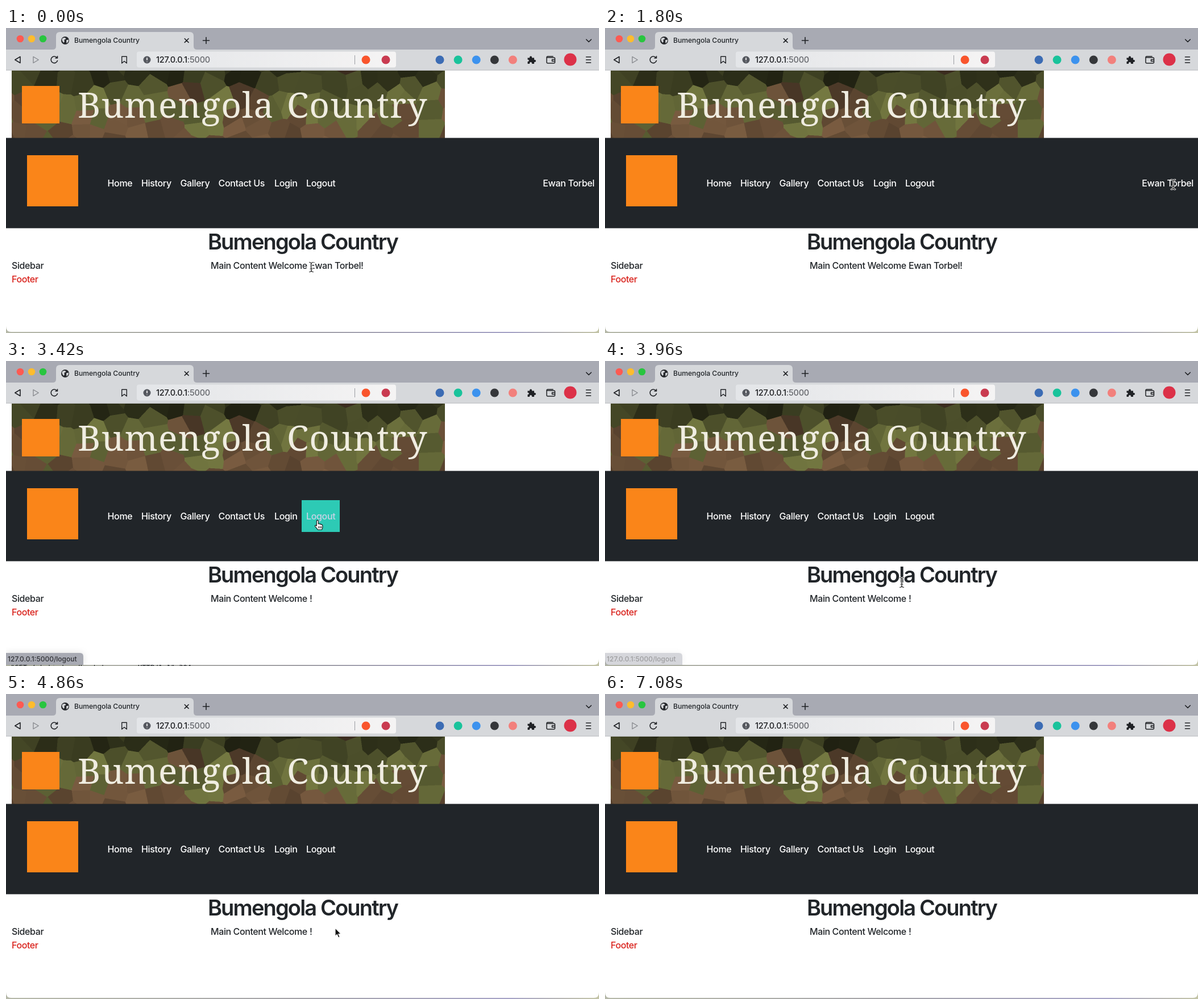
These frames come from a looping animation (1043x537 px, 7140 ms). An HTML page with a canvas:

```html
<!DOCTYPE html>
<html lang="en">
<head>
<meta charset="utf-8">
<title>Bumengola Country</title>
<style>
  html, body { margin: 0; width: 100%; height: 100%; overflow: hidden; background: #fff; }
  canvas { position: absolute; left: 10px; top: 75px; width: 761.5px; height: 119px; }
  svg { position: absolute; left: 0; top: 0; }
  text { font: 450 16px Inter, "Open Sans", sans-serif; font-optical-sizing: none; letter-spacing: -.4px; white-space: pre; fill: #212529; }
  .nav text { fill: #fff; letter-spacing: -.34px; }
  .title { font-size: 38px; font-weight: 560; letter-spacing: -1.85px; }
  .banner { font: 500 62px "Noto Serif", serif; letter-spacing: 1.2px; fill: #f0ede1; }
  .tab { font-size: 12.2px; font-weight: 500; letter-spacing: -.05px; }
  .url { font-size: 14.5px; letter-spacing: -.2px; fill: #1c1d20; }
  .small { font-size: 12px; letter-spacing: 0; fill: #303136; }
  .log { font: 12px "DejaVu Sans Mono", monospace; letter-spacing: 0; }
  .line { fill: none; stroke: #202226; stroke-width: 1.6; stroke-linejoin: round; stroke-linecap: round; }
  #status { filter: drop-shadow(0 0 6px #0002); }
</style>
</head>
<body>
<canvas id="mosaic" width="1524" height="238"></canvas>
<svg width="1043" height="537" viewBox="0 0 1043 537">
  <defs>
    <linearGradient id="field"><stop stop-color="#e3e5e8"/><stop offset="1" stop-color="#f5f4f4"/></linearGradient>
    <linearGradient id="desk"><stop stop-color="#b5b8a8"/><stop offset=".5" stop-color="#a3a2a8"/><stop offset=".85" stop-color="#a5a2c6"/><stop offset="1" stop-color="#c3c4a6"/></linearGradient>
    <clipPath id="edge"><rect y="534" width="1043" height="3"/></clipPath>
    <path id="bar" d="M-3.5 -8.5Q0 -8.5 0 -5.5Q0 -8.5 3.5 -8.5M0 -5.5V5.5M-3.5 8.5Q0 8.5 0 5.5Q0 8.5 3.5 8.5M-2 3H2"/>
  </defs>

  <!-- window bottom -->
  <path d="M0 525Q0 535 9 535H1034Q1043 535 1043 525V537H0Z" fill="url(#desk)"/>
  <g id="log" clip-path="url(#edge)"><text class="log" x="8" y="543.5">"GET /static/css/bootstrap.css HTTP/1.1" 304 -</text></g>

  <!-- tab strip and toolbar -->
  <rect width="1043" height="39" fill="#a8aab3"/>
  <rect y="38" width="1043" height="36" fill="#d6d8db"/>
  <path d="M0 74.2H1043" stroke="#b4b7bb"/>
  <path d="M82 38Q88 38 88 32V14Q88 7 95 7H323Q330 7 330 14V32Q330 38 336 38Z" fill="#d6d8db"/>
  <circle cx="104" cy="22" r="7" fill="#26282c"/>
  <path d="M99 18.5Q102 16 104.5 17.5T102 21Q104 23 101.5 26Q99 23.5 98.5 21ZM106 21.5L110 20.5Q110 25 106.5 27Z" fill="#d6d8db"/>
  <text class="tab" x="120" y="26.3">Bumengola Country</text>
  <g class="line">
    <path d="M314.3 18.7L321 25.4M321 18.7L314.3 25.4M346.5 22H357.5M352 16.5V27.5M1020.7 20.2L1025 24.4L1029.3 20.2"/>
    <path d="M25 50.5V61.5L15.8 56Z"/>
    <path d="M48 50.5V61.5L57.2 56Z" stroke="#85878c" stroke-width="1.3"/>
    <path d="M89.6 52.3A5.8 5.8 0 1 0 90.5 57.5M90.5 49.7V53H87"/>
    <path d="M203.7 50.3H212.3V62L208 58.5L203.7 62Z" stroke-width="1.4"/>
    <path d="M951.5 52H963.5Q965.5 52 965.5 54V60Q965.5 62 963.5 62H953Q951 62 951 60V52Q951 50 953 50H962M965 55.5H960.5V58.5H965" stroke-width="1.5"/>
    <path d="M1020.5 51H1028.5M1020.5 56H1028.5M1020.5 61H1028.5"/>
  </g>
  <rect x="230" y="41.5" width="456" height="28" rx="4" fill="url(#field)"/>
  <circle cx="248" cy="56" r="6.5" fill="#55585f"/>
  <path d="M248 52.3V56.7M248 59V59.8" stroke="#fff" stroke-width="1.6"/>
  <text class="url" x="264" y="61">127.0.0.1<tspan fill="#65676c">:5000</tspan></text>
  <path d="M613.5 48V64" stroke="#9b9da2"/>
  <path d="M917.5 52.5H921V51.5A2 2 0 0 1 925 51.5V52.5H929V56H930A2 2 0 0 1 930 60H929V63H925V62A2 2 0 0 0 921 62V63H917.5V59H918.5A1.7 1.7 0 0 0 918.5 55.7H917.5Z" fill="#202226"/>
  <g id="dots"></g>

  <!-- banner -->
  <rect x="28" y="102" width="66" height="66" fill="#fa8519"/>
  <text class="banner" x="126" y="158">Bumengola</text>
  <text class="banner" x="494" y="158">Country</text>

  <!-- navigation -->
  <rect y="193.5" width="1043" height="159" fill="#212529"/>
  <rect x="37" y="224" width="90" height="90" fill="#fa8519"/>
  <rect id="hover" x="520" y="245" width="67" height="56" fill="#2dcab5"/>
  <g class="nav">
    <text x="178.5" y="279">Home</text>
    <text x="238" y="279">History</text>
    <text x="306.5" y="279">Gallery</text>
    <text x="373.5" y="279">Contact Us</text>
    <text x="472" y="279">Login</text>
    <text id="logout" x="528" y="279">Logout</text>
    <text id="user" x="1035" y="279" text-anchor="end">Ewan Torbel</text>
  </g>

  <!-- page -->
  <text class="title" x="522" y="390" text-anchor="middle">Bumengola Country</text>
  <text x="10" y="424">Sidebar</text>
  <text x="10" y="448" style="fill:#d9211b">Footer</text>
  <rect id="mark" x="534" y="406" height="24" fill="#b3d7fe"/>
  <text x="360" y="424">Main Content Welcome <tspan id="name" x="534">Ewan Torbel!</tspan></text>

  <g id="status">
    <path d="M0 514H130Q136 514 136 520V535H0Z" fill="#a8aab3"/>
    <text class="small" x="3" y="529">127.0.0.1:5000/logout</text>
  </g>

  <!-- pointers, hot spot at 0,0 -->
  <g id="beam" fill="none" stroke-linecap="round">
    <use href="#bar" stroke="#fff" stroke-width="2.8"/>
    <use href="#bar" stroke="#222" stroke-width="1.2"/>
  </g>
  <path id="arrow" d="M0 0V14.5L3.3 11.5L5.6 17L8.1 16L5.8 10.6H10.3Z" fill="#111" stroke="#fff" stroke-width="1.1"/>
  <path id="hand" d="M-1.5 8.5V1Q-1.5 -.6 0 -.6T1.5 1V6Q3.3 4.8 4.4 6.5Q6 5.6 7 7.2Q9 6.8 9 9V12Q9 14 7.7 16H.5Q-1 13.5 -3.8 10.6Q-5 8.8 -3.4 8.3Q-2.4 8.2 -1.5 9.5ZM2 10V13.5M4.5 10V13.5M6.8 10V13.5" fill="#fff" stroke="#111" stroke-width="1.1" stroke-linejoin="round"/>
</svg>
<script>
const LOOP = 7140, STEP = 60;
const $ = id => document.getElementById(id);
const show = (id, on) => $(id).style.display = on ? '' : 'none';
const ramp = (t, a, b) => Math.min(1, Math.max(0, (t - a) / (b - a)));
const between = (v, a, b) => v >= a && v < b;

// pointer stops: time, x, y, sideways sway until the next stop
const stops = [
  [0, 537, 421], [360, 608, 421], [1020, 968, 271, 25], [2160, 985, 277],
  [2400, 546, 281], [3660, 548, 281], [3960, 522, 390], [4200, 525, 420, 20],
  [4860, 579, 412], [5040, 985, 276, 25], [5820, 1005, 275], [6240, 900, 560],
  [LOOP, 900, 560]
];

function pointer(t) {
  const i = stops.findIndex(s => s[0] > t);
  const [a, x0, y0, sway = 0] = stops[i - 1], [b, x1, y1] = stops[i];
  const u = ramp(t, a, b), e = u * u * (3 - 2 * u);
  return [x0 + (x1 - x0) * e + sway * Math.sin(u * 4 * Math.PI), y0 + (y1 - y0) * e];
}

function draw(now) {
  const t = Math.floor(now % LOOP / STEP) * STEP;
  const [x, y] = pointer(t);
  const named = t < 3120;
  const hover = between(x, 520, 587) && between(y, 245, 301);
  const overText = t < 420
    || between(y, 360, 397) && between(x, 355, 690)
    || between(y, 408, 430) && between(x, 358, named ? 630 : 550)
    || named && between(y, 263, 286) && x > 944;
  const kind = hover ? 'hand' : overText ? 'beam' : 'arrow';
  for (const id of ['beam', 'arrow', 'hand']) {
    show(id, id === kind);
    $(id).setAttribute('transform', `translate(${x.toFixed(1)} ${y.toFixed(1)})`);
  }

  show('hover', hover);
  $('logout').style.fill = hover ? '#c9d3e6' : '';
  show('user', named);
  $('name').textContent = named ? 'Ewan Torbel!' : '!';

  const letters = t < 360 ? Math.round((x - 534) / 8.35) : 9;
  $('mark').setAttribute('width', t < 1500 ? Math.max(0, letters * 8.35) : 0);
  $('status').style.opacity = ramp(t, 2330, 2480) * (1 - ramp(t, 3870, 4040));
  show('log', between(t, 3120, 3720));
}

function dots(x, y, gap, r, colours) {
  $('dots').innerHTML += colours.split(' ')
    .map((c, i) => `<circle cx="${x + gap * i}" cy="${y}" r="${r}" fill="#${c}"/>`).join('');
}

function paintMosaic() {
  const cv = $('mosaic'), g = cv.getContext('2d'), W = cv.width, H = cv.height;
  let seed = 41;
  const rnd = () => (seed = seed * 16807 % 2147483647) / 2147483647;
  const olive = [1, 1.04, .56], brown = [1.06, .8, .56];

  // dark olive at the top, greens in the middle, more brown towards the bottom
  const cells = [];
  for (let r = -1; r < 5; r++) for (let c = -1; c < 24; c++) {
    const x = (c + .1 + rnd() * .9) * 68, y = (r + .1 + rnd() * .9) * 60, v = y / H;
    const light = 48 + 52 * ramp(v, .08, .42) + (rnd() - .5) * 34;
    const tint = rnd() < .06 + .7 * v * v ? brown : olive;
    cells.push({ x, y, rgb: tint.map(k => k * light) });
  }

  const img = g.createImageData(W, H), d = img.data;
  for (let y = 0, i = 0; y < H; y++) {
    const near = cells.filter(s => Math.abs(s.y - y) < 130);
    for (let x = 0; x < W; x++, i += 4) {
      let best = 1e9, rgb;
      for (const s of near) {
        const dx = s.x - x, dy = s.y - y, q = dx * dx + dy * dy;
        if (q < best) { best = q; rgb = s.rgb; }
      }
      [d[i], d[i + 1], d[i + 2]] = rgb;
      d[i + 3] = 255;
    }
  }
  g.putImageData(img, 0, 0);
}

dots(25, 19, 20, 6.3, 'fe5a52 febc2e 28c53f');
dots(633, 56, 35, 7.5, 'f9552d c93b50');
dots(763, 56, 32.1, 7.5, '3c6cb4 19c39b 3c92ee 35373a f2807c');
dots(992.5, 55.5, 0, 11, 'dc3148');
paintMosaic();
const start = performance.now();
function frame() {
  draw(performance.now() - start);
  requestAnimationFrame(frame);
}
frame();
</script>
</body>
</html>
```
